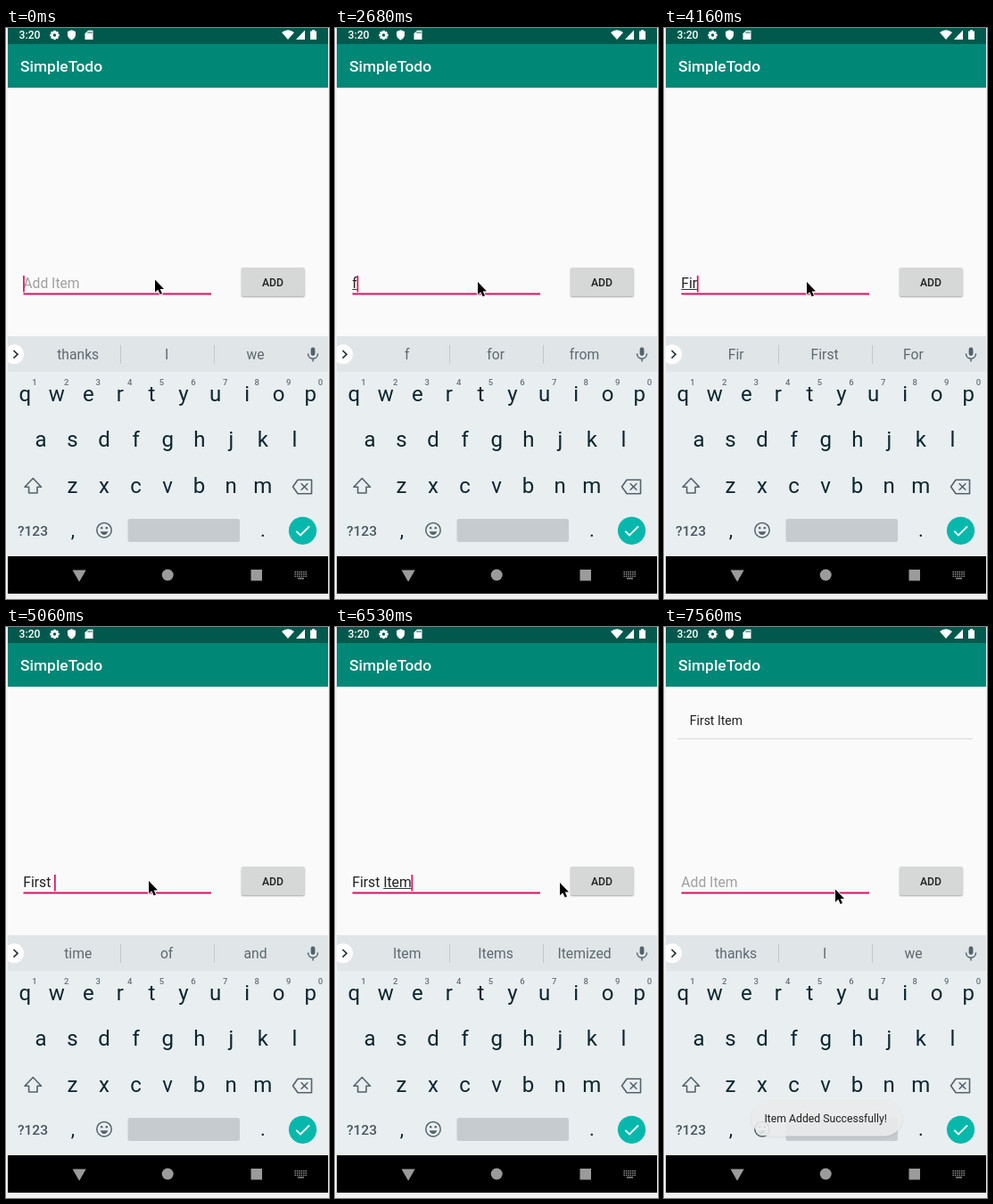
Animation of 362 by 641 pixels, one loop 8000 ms. Source, as an HTML page with a canvas:

```html
<!DOCTYPE html>
<html lang="en">
<head>
<meta charset="utf-8">
<title>SimpleTodo</title>
<style>
  html, body { margin: 0; width: 100%; height: 100%; overflow: hidden; background: #f1f1f1; }
  canvas { display: block; width: 362px; height: 641px; }
</style>
</head>
<body>
<canvas id="stage"></canvas>
<script>
const W = 362, H = 641, LOOP = 8000;
const canvas = document.getElementById('stage');
const dpr = window.devicePixelRatio || 1;
canvas.width = Math.round(W * dpr);
canvas.height = Math.round(H * dpr);
const ctx = canvas.getContext('2d');
ctx.scale(dpr, dpr);

const INK = '#0c2630', ICON = '#53636b', PINK = '#d8125f', NAV = '#9b9b9b';
const BODY = 15.7;
const IDLE = 'thanks I we';

// Each entry changes part of the screen state from its time on.
const events = [
  [0, { caret: true, pos: [166, 281.5], done: '', word: '', hints: IDLE,
        item: false, pressed: false, toast: 0 }],
  [450, { caret: false }],
  [900, { caret: true }],
  [1040, { pos: [164, 282.5] }],
  [1180, { pos: [159, 284] }],
  [1330, { caret: false }],
  [1930, { caret: true }],
  [2380, { word: 'f' }],
  [2530, { hints: 'f for from' }],
  [3120, { word: '' }],
  [3270, { hints: IDLE }],
  [3860, { word: 'F', hints: 'F For From' }],
  [4010, { word: 'Fi', hints: 'Fi First Find' }],
  [4160, { word: 'Fir', hints: 'Fir First For' }],
  [4310, { word: 'Firs', hints: 'Firs First Firstly' }],
  [4460, { word: 'First', hints: 'First Firsts Firstborn' }],
  [4910, { done: 'First ', word: '' }],
  [5060, { hints: 'time of and' }],
  [5350, { word: 'I', hints: 'I I\'m In' }],
  [5650, { word: 'It', hints: 'It It\'s Is' }],
  [5790, { word: 'Ite', hints: 'Ite Item It' }],
  [6090, { word: 'Item', hints: 'Item Items Itemized' }],
  [6380, { pos: [186, 285] }],
  [6530, { pos: [251, 286] }],
  [6670, { pos: [288, 285] }],
  [6820, { pressed: true }],
  [6970, { done: '', word: '', item: true }],
  [7120, { pressed: false, hints: IDLE }],
  [7260, { pos: [265, 288], toast: 0.5 }],
  [7410, { pos: [214, 291], toast: 1, caret: false }],
  [7560, { pos: [191, 293.5] }]
];

function stateAt(t) {
  const state = {};
  for (const [start, change] of events) if (start <= t) Object.assign(state, change);
  return state;
}

function rect(x, y, w, h, color) {
  ctx.fillStyle = color;
  ctx.fillRect(x, y, w, h);
}

function round(x, y, w, h, r, color) {
  ctx.beginPath();
  ctx.roundRect(x, y, w, h, r);
  ctx.fillStyle = color;
  ctx.fill();
}

function disc(x, y, r, color) {
  ctx.beginPath();
  ctx.arc(x, y, r, 0, Math.PI * 2);
  ctx.fillStyle = color;
  ctx.fill();
}

function fill(d, color) {
  ctx.fillStyle = color;
  ctx.fill(new Path2D(d));
}

function stroke(d, color, width) {
  ctx.strokeStyle = color;
  ctx.lineWidth = width;
  ctx.stroke(new Path2D(d));
}

function setFont(size, weight = 400) {
  ctx.font = `${weight} ${size}px Roboto, sans-serif`;
}

function text(s, x, y, size, color, weight = 400, align = 'left') {
  setFont(size, weight);
  ctx.textAlign = align;
  ctx.fillStyle = color;
  ctx.fillText(s, x, y);
}

function shadow(color, blur, dy) {
  ctx.shadowColor = color;
  ctx.shadowBlur = blur * dpr;
  ctx.shadowOffsetY = dy * dpr;
}

function drawHeader() {
  rect(2, 0, 359, 18, '#00594c');
  rect(2, 18, 359, 49, '#008776');
  text('SimpleTodo', 16, 49, 17.4, '#fff', 500);
  text('3:20', 14.5, 12.3, 12.2, '#fff', 500);

  for (let i = 0; i < 4; i++) {
    ctx.save();
    ctx.translate(54.5, 8);
    ctx.rotate(i * Math.PI / 4);
    rect(-1.3, -5.2, 2.6, 10.4, '#fff');
    ctx.restore();
  }
  disc(54.5, 8, 3.9, '#fff');
  disc(54.5, 8, 1.7, '#00594c');
  fill('M73.5 2.3L78 4V8Q77.5 11.8 73.5 13.6Q69.5 11.8 69 8V4Z', '#fff');
  fill('M92 2.8H97.5V13H88.5V6.3Z', '#fff');
  for (let i = 0; i < 3; i++) rect(91.6 + i * 1.9, 4, 0.9, 2.2, '#00594c');
  fill('M309 5Q316 -0.5 323 5L316 13Z', '#fff');
  fill('M335 2.5V13H325Z', '#fff');
  fill('M341 3.5H343V2.3H346V3.5H348V13H341Z', '#fff');
}

function drawForm(s) {
  rect(2, 67, 359, 279, '#fafafa');
  if (s.item) {
    text('First Item', 28.8, 109.5, 13.97, '#202020');
    rect(15, 125, 331, 1, '#d9d9d9');
  }

  const x = 19.3, full = s.done + s.word;
  text(full || 'Add Item', x, 292, BODY, full ? '#212121' : '#a0a0a0');
  const from = ctx.measureText(s.done).width;
  const to = ctx.measureText(full).width;
  if (s.word) rect(x + from, 293, to - from, 1, '#333');
  rect(19.5, 297.5, 210.5, 2, PINK);
  if (s.caret) rect(x + to - 0.2, 278, 1.7, 18.5, PINK);

  ctx.save();
  shadow('rgba(0,0,0,.35)', 2, 1);
  round(264, 269, 70.5, 32, 1.5, s.pressed ? '#babcbb' : '#d6d7d7');
  ctx.restore();
  text('ADD', 299, 290, 12.2, '#202020', 500, 'center');
}

function drawHints(hints) {
  rect(2, 346, 359, 40, '#e0e5e8');
  ctx.save();
  ctx.beginPath();
  ctx.rect(2, 346, 40, 40);
  ctx.clip();
  disc(9, 366.3, 11, '#fff');
  ctx.restore();
  stroke('M8.5 362L13 366.3L8.5 370.6', '#26343a', 1.7);
  rect(128, 356, 1, 21, '#c2c8cb');
  rect(233, 356, 1, 21, '#c2c8cb');
  hints.split(' ').forEach((h, i) =>
    text(h, 80.7 + i * 99.4, 372, BODY, '#5d696f', 400, 'center'));
  round(341.6, 358.5, 4.8, 9.5, 2.4, ICON);
  stroke('M338.5 365.5C338.5 373 349.5 373 349.5 365.5M344 371V374.5', ICON, 1.5);
}

function drawKeys() {
  rect(2, 386, 359, 207, '#e9eef1');
  const rows = [['qwertyuiop', 21.2, 419], ['asdfghjkl', 39, 470], ['zxcvbnm', 74.4, 522]];
  for (const [keys, x0, y] of rows)
    [...keys].forEach((k, i) => text(k, x0 + i * 35.55, y, 24, INK, 400, 'center'));
  for (let i = 0; i < 10; i++)
    text((i + 1) % 10, 32 + i * 35.6, 401, 9.5, '#65737a', 500, 'center');

  ctx.lineJoin = 'round';
  stroke('M30.3 505.5L39.5 515.3H35V522H25.6V515.3H21Z', ICON, 1.6);
  stroke('M321.5 515L327 507.3H342.5V522.7H327Z', ICON, 1.6);
  stroke('M330.7 511.2L338.3 518.8M338.3 511.2L330.7 518.8', ICON, 1.6);
  ctx.lineJoin = 'miter';

  text('?123', 30, 569.5, 15.5, '#47575f', 500, 'center');
  text(',', 75, 570.5, 22, INK, 400, 'center');
  text('.', 288, 570.5, 22, INK, 400, 'center');
  ctx.beginPath();
  ctx.arc(110, 563.7, 8.2, 0, Math.PI * 2);
  ctx.strokeStyle = ICON;
  ctx.lineWidth = 1.5;
  ctx.stroke();
  disc(107.2, 561.3, 1.3, ICON);
  disc(112.8, 561.3, 1.3, ICON);
  fill('M105.6 565.3H114.4Q113 569 110 569Q107 569 105.6 565.3Z', ICON);
  round(136.5, 551, 125.5, 26, 2.5, '#c6cbd0');
  disc(332.5, 564.3, 15.6, '#06b8ab');
  stroke('M325.3 564.8L330 569.5L340 559.5', '#fff', 1.9);
}

function drawNav() {
  rect(2, 593, 359, 42, '#000');
  fill('M74.5 608.5H89.7L82.1 621.8Z', NAV);
  disc(181.2, 614, 6.5, NAV);
  rect(274.5, 608, 12.5, 12.5, NAV);
  for (let r = 0; r < 3; r++)
    for (let c = 0; c < 6; c++) rect(323.5 + c * 2.4, 610 + r * 2.4, 1.4, 1.4, NAV);
  rect(327, 617.3, 7, 1.3, NAV);
}

function drawToast(alpha) {
  ctx.save();
  ctx.globalAlpha = alpha;
  shadow('rgba(0,0,0,.1)', 3, 1);
  round(98, 532, 169, 39.5, 19.7, 'rgba(237,238,238,.88)');
  ctx.shadowColor = 'transparent';
  text('Item Added Successfully!', 112.5, 556, 12.22, '#222');
  ctx.restore();
}

function drawPointer([x, y]) {
  ctx.save();
  ctx.translate(x, y);
  const arrow = 'M1 1V15.2L4.3 12.2L6.7 17.6L9 16.6L6.7 11.4H11Z';
  ctx.lineJoin = 'round';
  stroke(arrow, '#fff', 1.8);
  fill(arrow, '#000');
  ctx.restore();
}

function draw(t) {
  const s = stateAt(t);
  rect(0, 0, W, H, '#f1f1f1');
  drawHeader();
  drawForm(s);
  drawHints(s.hints);
  drawKeys();
  drawNav();
  if (s.toast) drawToast(s.toast);
  drawPointer(s.pos);
}

const begin = performance.now();
function tick() {
  draw((performance.now() - begin) % LOOP);
  requestAnimationFrame(tick);
}
tick();
</script>
</body>
</html>
```
